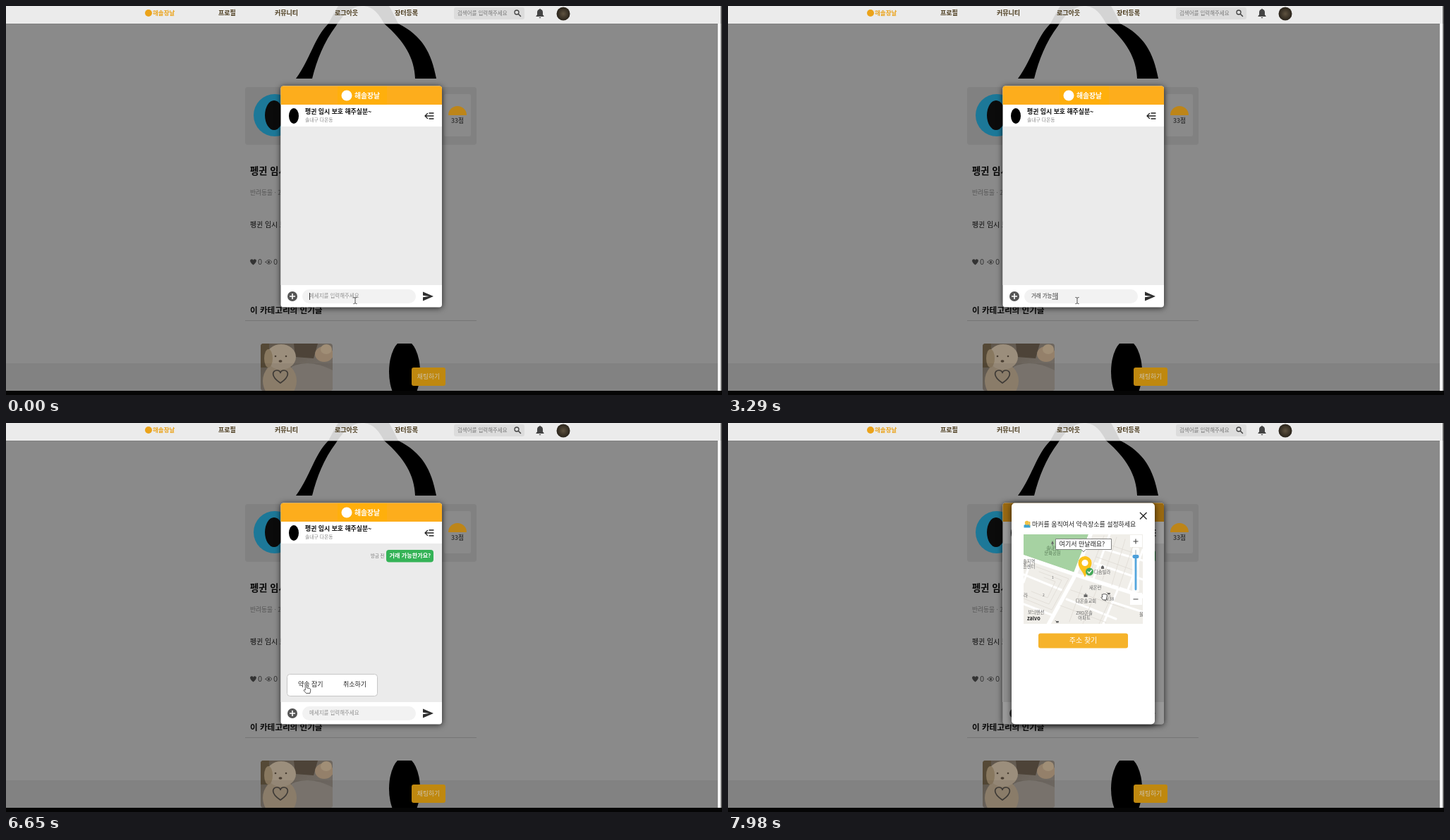
Animation, 1015 px wide and 552 px high, one loop 8 s. Source, as an HTML page:

```html
<!DOCTYPE html>
<html lang="ko">
<head>
<meta charset="utf-8">
<title>채팅 약속 잡기</title>
<style>
html, body { margin: 0; width: 100%; height: 100%; overflow: hidden; background: #8a8a8a; }
svg { display: block; width: 100%; height: 100%; }
text { font-family: "Noto Sans CJK KR", "Noto Sans CJK", sans-serif; white-space: pre; }
.b { font-weight: 700; }
.m { font-weight: 500; }
.c { text-anchor: middle; }
.line { fill: none; stroke-linecap: round; stroke-linejoin: round; }
.shadow { filter: drop-shadow(0 1px 4px rgba(0, 0, 0, .75)); }

.timed { animation: 8s step-end infinite; }
.bubble { animation-name: bubble; }
.menu { animation-name: menu; }
.modal { animation-name: modal; }
.map { animation-name: map; }
.caret { animation-name: caret; }
.beam { animation-name: beam; }
.arrow { animation-name: arrow; }
.hand { animation-name: hand; }
.palm { animation-name: palm; }
.cursor { animation-name: move; }

@keyframes bubble { 0% { visibility: hidden } 56.75%, 100% { visibility: visible } }
@keyframes menu { 0%, 84.75% { visibility: hidden } 72.5% { visibility: visible } 100% { visibility: hidden } }
@keyframes modal { 0% { visibility: hidden } 84.75%, 100% { visibility: visible } }
@keyframes map { 0% { visibility: hidden } 86%, 100% { visibility: visible } }
@keyframes caret {
  0%, 9.5%, 16.5%, 63.7% { visibility: visible }
  2.6%, 14.8%, 56.75%, 70%, 100% { visibility: hidden }
}
@keyframes beam { 0% { visibility: visible } 63.7%, 100% { visibility: hidden } }
@keyframes arrow {
  0%, 69%, 89.1%, 100% { visibility: hidden }
  63.7%, 84.75% { visibility: visible }
}
@keyframes hand {
  0%, 84.75%, 91.8%, 100% { visibility: hidden }
  69%, 89.1% { visibility: visible }
}
@keyframes palm { 0% { visibility: hidden } 91.8%, 100% { visibility: visible } }
@keyframes move {
  0% { transform: translate(495px, 418px) }
  63.7% { transform: translate(461px, 426px) }
  66.5% { transform: translate(461px, 426px); animation-timing-function: ease-in-out }
  70% { transform: translate(405px, 410px) }
  75.2% { transform: translate(405px, 410px); animation-timing-function: ease-in-out }
  80.5% { transform: translate(425px, 372px) }
  84.75% { transform: translate(422px, 372px) }
  88.3% { transform: translate(422px, 372px); animation-timing-function: linear }
  89.1% { transform: translate(470px, 306px) }
  91.8% { transform: translate(497px, 293px) }
  97.9% { transform: translate(510px, 275px); animation-timing-function: linear }
  99.6%, 100% { transform: translate(533px, 246px) }
}
</style>
</head>
<body>
<svg viewBox="0 0 1015 552" preserveAspectRatio="none">
  <defs>
    <clipPath id="photo"><rect x="361" y="479" width="102" height="67" rx="4"/></clipPath>
    <clipPath id="thumb"><rect x="530" y="479" width="70" height="67"/></clipPath>
    <clipPath id="mapBox"><rect x="419" y="158" width="169" height="127"/></clipPath>
    <radialGradient id="face"><stop stop-color="#5f5340"/><stop offset="1" stop-color="#29231a"/></radialGradient>
    <linearGradient id="quilt" x2="1" y2="1"><stop stop-color="#5d5347"/><stop offset=".5" stop-color="#6d665e"/><stop offset="1" stop-color="#77726d"/></linearGradient>
  </defs>

  <!-- dimmed page -->
  <rect width="1015" height="552" fill="#8a8a8a"/>
  <path d="M411 103C431 76 437 45 457 25C468 5 480 -24 506 -24C535 -24 546 5 556 25C590 42 603 66 610 103H580C579 74 565 50 536 25C528 10 520 0 505 0C490 0 478 12 468 28C450 52 441 76 434 103Z"/>
  <rect x="339" y="115" width="328" height="82" rx="4" fill="#818181"/>
  <circle cx="381" cy="155" r="30" fill="#1c7898"/>
  <ellipse cx="380" cy="155" rx="13" ry="21" fill="#0b0b0b"/>
  <rect x="621" y="125" width="38" height="60" rx="2" fill="#8a8a8a"/>
  <path d="M627 155a13 13 0 0 1 26 0Z" fill="#bd8518"/>
  <text class="b c" x="640" y="166" font-size="8.6" fill="#3b3b3b">33점</text>
  <text class="b" x="346" y="238.500" font-size="13.300" fill="#080808">펭귄 임시 보호 해주실분~</text>
  <text class="m" x="346" y="267.500" font-size="8.700" fill="#555">반려동물 · 2일 전</text>
  <text class="m" x="346" y="313.500" font-size="9.900" fill="#0c0c0c">펭귄 임시 보호 해주실분~</text>
  <path d="M350.500 367.500C344 362.500 346 359.300 348.400 359.300Q350 359.300 350.500 360.700Q351 359.300 352.600 359.300C355 359.300 357 362.500 350.500 367.500Z" fill="#333"/>
  <path class="line" d="M368 363.300Q372.500 357.300 377 363.300Q372.500 369.300 368 363.300Z" stroke="#3a3a3a"/>
  <circle cx="372.500" cy="363.300" r="1.600" fill="#3a3a3a"/>
  <g font-size="11" fill="#333"><text x="357" y="367">0</text><text x="379" y="367">0</text></g>
  <text class="b" x="346" y="436" font-size="11.600" fill="#080808">이 카테고리의 인기글</text>
  <path d="M339 446.500H667" stroke="#767676"/>

  <g clip-path="url(#photo)">
    <rect x="361" y="479" width="102" height="67" fill="url(#quilt)"/>
    <path d="M408 479H442L436 500L410 498Z" fill="#4d4338"/>
    <path d="M405 512Q430 500 463 517V546H400Z" fill="#7f7972"/>
    <rect x="361" y="479" width="12" height="34" fill="#554936"/>
    <ellipse cx="451" cy="494" rx="13" ry="11" fill="#94806a"/>
    <ellipse cx="454" cy="487" rx="8" ry="7" fill="#a08e76"/>
    <ellipse cx="388" cy="532" rx="24" ry="26" fill="#92836f"/>
    <ellipse cx="390" cy="498" rx="21" ry="18" fill="#9b8e7c"/>
    <ellipse cx="372" cy="500" rx="6" ry="13" fill="#88785f"/>
    <circle cx="382" cy="497" r="1.300" fill="#4a3f33"/><circle cx="397" cy="497" r="1.300" fill="#4a3f33"/>
    <ellipse cx="389" cy="504" rx="2.500" ry="1.800" fill="#4a3f33"/>
  </g>
  <ellipse cx="565" cy="519" rx="22" ry="45" clip-path="url(#thumb)"/>
  <rect y="507" width="1009" height="39" fill="#000" opacity=".055"/>
  <path class="line" d="M389 535C374 525 378 517 384 517Q388 517 389 520.500Q390 517 394 517C400 517 404 525 389 535Z" stroke="#3e3a36" stroke-width="1.700"/>
  <rect x="575" y="513" width="48" height="26" rx="3" fill="#bf880f"/>
  <text class="m c" x="599" y="529" font-size="8.800" fill="#cdc2aa">채팅하기</text>
  <rect y="546" width="1015" height="6" fill="#050505"/>
  <rect x="1009" y="25" width="4.500" height="521" fill="#f4f4f4"/>
  <rect x="1013.500" width="1.500" height="546" fill="#555"/>

  <!-- top bar -->
  <rect width="1013" height="25" fill="#fff" opacity=".83"/>
  <path d="M0 25.500H1009" stroke="#777" opacity=".5"/>
  <circle cx="202" cy="10" r="5" fill="#eba31a"/>
  <text class="b" x="208" y="13" font-size="8.500" fill="#eba31a">해솔장날</text>
  <g class="b" font-size="9" fill="#4a3a1c">
    <text x="301" y="13">프로필</text><text x="381" y="13">커뮤니티</text>
    <text x="466" y="13">로그아웃</text><text x="551" y="13">장터등록</text>
  </g>
  <rect x="635" y="2" width="100" height="17" rx="3" fill="#dcdcdc"/>
  <text x="640" y="12.700" font-size="7.450" fill="#777">검색어를 입력해주세요</text>
  <path class="line" d="M726.500 11.500L729.500 14.500" stroke="#444" stroke-width="1.500"/>
  <circle class="line" cx="724" cy="9" r="3" stroke="#444" stroke-width="1.300"/>
  <path d="M751.500 15V14L753 12.500V9Q753 5.500 756 4.800Q757 2.500 758 4.800Q761 5.500 761 9V12.500L762.500 14V15ZM755.500 16H758.500Q757 18.500 755.500 16Z" fill="#444"/>
  <circle cx="790" cy="11" r="9.500" fill="url(#face)"/>

  <!-- chat window -->
  <rect class="shadow" x="389.500" y="113.500" width="228.500" height="314" rx="4" fill="#fff"/>
  <path d="M389.500 140V117.500Q389.500 113.500 393.500 113.500H614Q618 113.500 618 117.500V140Z" fill="#fdad1c"/>
  <rect x="470" y="114" width="70" height="26" fill="#ffaf0c"/>
  <circle cx="483" cy="127" r="7.500" fill="#fff"/>
  <text class="b" x="494" y="130.700" font-size="9.800" fill="#fff">해솔장날</text>
  <ellipse cx="408" cy="156" rx="7" ry="11"/>
  <text class="b" x="424" y="153.300" font-size="8.900" fill="#111">펭귄 임시 보호 해주실분~</text>
  <text x="424" y="164" font-size="6.800" fill="#8a8a8a">솔내구 다온동</text>
  <path class="line" d="M594 156H606M597.500 152.500L594 156L597.500 159.500M600 152H606M600 160H606" stroke="#222" stroke-width="1.300"/>
  <rect x="389.500" y="171" width="228.500" height="225" fill="#ebebeb"/>
  <circle cx="406" cy="412" r="7" fill="#555"/>
  <path d="M402 412H410M406 408V416" stroke="#fff" stroke-width="1.600"/>
  <rect x="420" y="402" width="161" height="20" rx="10" fill="#f2f2f2"/>
  <path d="M591 405.500L606 412L591 418.500V413.300L600 412L591 410.700Z" fill="#2f2f2f"/>
  <text id="hint" x="430" y="414.300" font-size="7.450" fill="#8f8f8f">메세지를 입력해주세요</text>
  <text id="typed" x="430" y="414.300" font-size="7.450" fill="#333"></text>
  <path id="under" stroke="#333" stroke-width=".8"/>
  <path id="caret" class="timed caret" d="M430.500 407V417" stroke="#222" stroke-width=".9"/>

  <g class="timed bubble">
    <text x="517" y="190.500" font-size="6.400" fill="#777">방금 전</text>
    <rect x="539" y="180" width="67" height="17.500" rx="4" fill="#35b357"/>
    <text class="b" x="543.500" y="191.300" font-size="8.150" fill="#fff">거래 가능한가요?</text>
  </g>
  <g class="timed menu" font-size="9">
    <rect x="398.500" y="356.500" width="128" height="31" rx="4" fill="#fff" stroke="#c6c6c6"/>
    <text class="m" x="414" y="374" fill="#222">약속 잡기</text>
    <text class="m" x="478" y="374" fill="#222">취소하기</text>
  </g>

  <!-- meeting place dialog -->
  <g class="timed modal">
    <rect x="389.500" y="113.500" width="228.500" height="314" rx="4" opacity=".4"/>
    <rect class="shadow" x="402" y="113.500" width="203" height="314" rx="5" fill="#fff"/>
    <path d="M584 127L593.500 136.500M593.500 127L584 136.500" stroke="#222" stroke-width="1.400"/>
    <path d="M419.500 148.500V145Q424 141.500 428.500 145V148.500Z" fill="#3fa4cf"/>
    <path class="line" d="M427.500 145V140.500" stroke="#e8b73c" stroke-width="1.600"/>
    <circle cx="423.800" cy="141.800" r="3" fill="#f1c244"/>
    <text x="431" y="146.600" font-size="8.950" fill="#222">마커를 움직여서 약속장소를 설정하세요</text>
    <rect x="440" y="298.500" width="127" height="21" rx="3" fill="#f6b32b"/>
    <text class="m c" x="503.500" y="311.700" font-size="10" fill="#fff">주소 찾기</text>

    <g class="timed map" clip-path="url(#mapBox)">
      <rect x="419" y="158" width="169" height="127" fill="#f0eee9"/>
      <path d="M419 158H511L491 212L419 187Z" fill="#a6d2a2"/>
      <g class="line" stroke="#fff">
        <path d="M419 190L492 215L588 246M514 158L490 220L452 290" stroke-width="5.500"/>
        <path d="M419 215L473 237M419 257L458 272M430 194L419 226M541 158L517 224M588 195L526 177M588 222L520 199M566 239L588 180M480 250L550 278M553 235L530 290M588 268L545 254" stroke-width="3"/>
      </g>
      <g class="line" stroke="#ddd9d1" stroke-width=".7">
        <path d="M437 204L483 221L459 265L419 249M441 211L473 223L455 257L421 244M448 219L464 225L453 248L430 239"/>
        <path d="M526 168L583 187M533 160L512 216M551 162L531 222M563 165L544 230M575 172L554 234M522 190L581 211M486 237L562 263M502 231L484 282M522 238L503 285M544 245L526 285M471 259L536 283"/>
      </g>
      <g font-size="6.300" fill="#666">
        <g class="c" fill="#587b57"><text x="460" y="179.500">솔내빛</text><text x="460" y="187">문화공원</text></g>
        <text x="418" y="198.500">솔지역</text><text x="418" y="206">총센터</text>
        <text x="519" y="214.300">다솜빌라</text>
        <text x="512" y="235.500">새온런</text>
        <text x="493" y="254.500">다온솔교회</text>
        <text x="532" y="251.500">QV38</text>
        <g class="c"><text x="505" y="271.500">ZRD온솔</text><text x="505" y="278.500">아파트</text></g>
        <text x="425" y="270.500">보늬맨션</text>
        <text x="419" y="246.500">라</text><text x="583" y="274">몰</text>
        <text x="459" y="221" font-size="5">1</text><text x="446" y="246" font-size="5">2</text>
      </g>
      <text class="b" x="424" y="280" font-size="7.200" fill="#222">zalvo</text>
      <g fill="#666">
        <path d="M460 167L458 171.500H459.500V174H460.500V171.500H462ZM529 207V204L531 202L533 204V207ZM504.500 247V243.500H506.500V241.500H507.500V243.500H509.500V247Z"/>
        <path id="cart" d="M536 240H537.500L538.300 243.500H541.500L542 241H538M538.500 245h1v1h-1zM541 245h1v1h-1z"/>
        <use href="#cart" x="-73" y="40"/>
      </g>

      <rect x="570" y="159" width="17" height="17" fill="#fff"/>
      <rect x="573" y="177" width="10" height="63" rx="2" fill="#fff" opacity=".8"/>
      <rect x="570" y="241" width="17" height="17" fill="#fff"/>
      <path d="M574.500 168H581.500M578 164.500V171.500M574.500 250H581.500" stroke="#444" stroke-width="1.100"/>
      <path class="line" d="M578 181V188" stroke="#c9d5dc" stroke-width="2"/>
      <path class="line" d="M578 189V236" stroke="#54a6dd" stroke-width="2.800"/>
      <rect x="573.500" y="187" width="9" height="5" rx="2" fill="#4c9fda"/>

      <path d="M506 219C503 210 496.500 206 496.500 198.500A9.500 9.500 0 0 1 515.500 198.500C515.500 206 509 210 506 219Z" fill="#fcc21b"/>
      <circle cx="506" cy="198.500" r="4.600" fill="#fff"/>
      <circle cx="512.500" cy="211" r="5.500" fill="#45a85a"/>
      <path class="line" d="M510 211L512 213L515.200 209" stroke="#fff" stroke-width="1.300"/>
      <path d="M464.500 164.500H543.500V179.500H507L504 183L501 179.500H464.500Z" fill="#fff" stroke="#777" stroke-width=".9"/>
      <text class="m c" x="502" y="175.300" font-size="9" fill="#222">여기서 만날래요?</text>
    </g>
  </g>

  <!-- pointer -->
  <g class="timed cursor">
    <path class="timed beam line" d="M-2.200 -4.500Q0 -4.500 0 -3.500Q0 -4.500 2.200 -4.500M0 -3.500V3.500M-2.200 4.500Q0 4.500 0 3.500Q0 4.500 2.200 4.500" stroke="#444" stroke-width=".9"/>
    <path class="timed arrow" d="M.500 .500V9L2.600 7.200L4 10L5.400 9.300L4.100 6.600H6.800Z" fill="#fff" stroke="#333" stroke-width=".8"/>
    <path class="timed hand" d="M-.700 .700Q.500 -.600 1.500 .700V4L5.800 4.800Q7 5.200 6.800 7L6 11.500H.500L-3 7.500Q-3 6 -.700 7Z" fill="#fff" stroke="#333" stroke-width=".8"/>
    <path class="timed palm" d="M-1.500 5L-4 1.500Q-3.500 0 -2 1.200L-3 -2.500Q-2 -3.800 -1.200 -2.500Q-.500 -4.800 .700 -3Q2 -4.500 2.600 -2.500Q4.300 -3.500 4.300 -1.200L3.500 5Z" fill="#fff" stroke="#333" stroke-width=".8"/>
  </g>
</svg>
<script>
const LOOP = 8000;
const keys = [
  [0, ""], [1320, "ㄱ"], [1530, "거"], [1670, "걸"], [1740, "거래"], [1880, "거래 "], [1950, "거래 ㄱ"],
  [2440, "거래 가"], [2720, "거래 간"], [2860, "거래 가느"], [3000, "거래 가능"], [3070, "거래 가능ㅎ"],
  [3280, "거래 가능하"], [3350, "거래 가능한"], [3490, "거래 가능한ㄱ"], [3840, "거래 가능한가"],
  [3980, "거래 가능한강"], [4120, "거래 가능한가요"], [4260, "거래 가능한가요?"], [4540, ""]
];
const [hint, typed, under, caret] = ["hint", "typed", "under", "caret"].map(id => document.getElementById(id));
let start, shown;

function show(text) {
  typed.textContent = text;
  hint.style.display = text ? "none" : "";
  const end = 430 + (text ? typed.getComputedTextLength() : 0);
  caret.setAttribute("d", `M${end + .5} 407V417`);
  // the syllable being composed is underlined
  const composing = /[ㄱ-힣]$/.test(text);
  under.setAttribute("d", composing ? `M${end - 6.9} 416H${end}` : "");
}

function tick(now) {
  start ??= now;
  const t = (now - start) % LOOP;
  const text = keys.findLast(([ms]) => ms <= t)[1];
  if (text !== shown) show(shown = text);
  requestAnimationFrame(tick);
}
requestAnimationFrame(tick);
</script>
</body>
</html>
```
